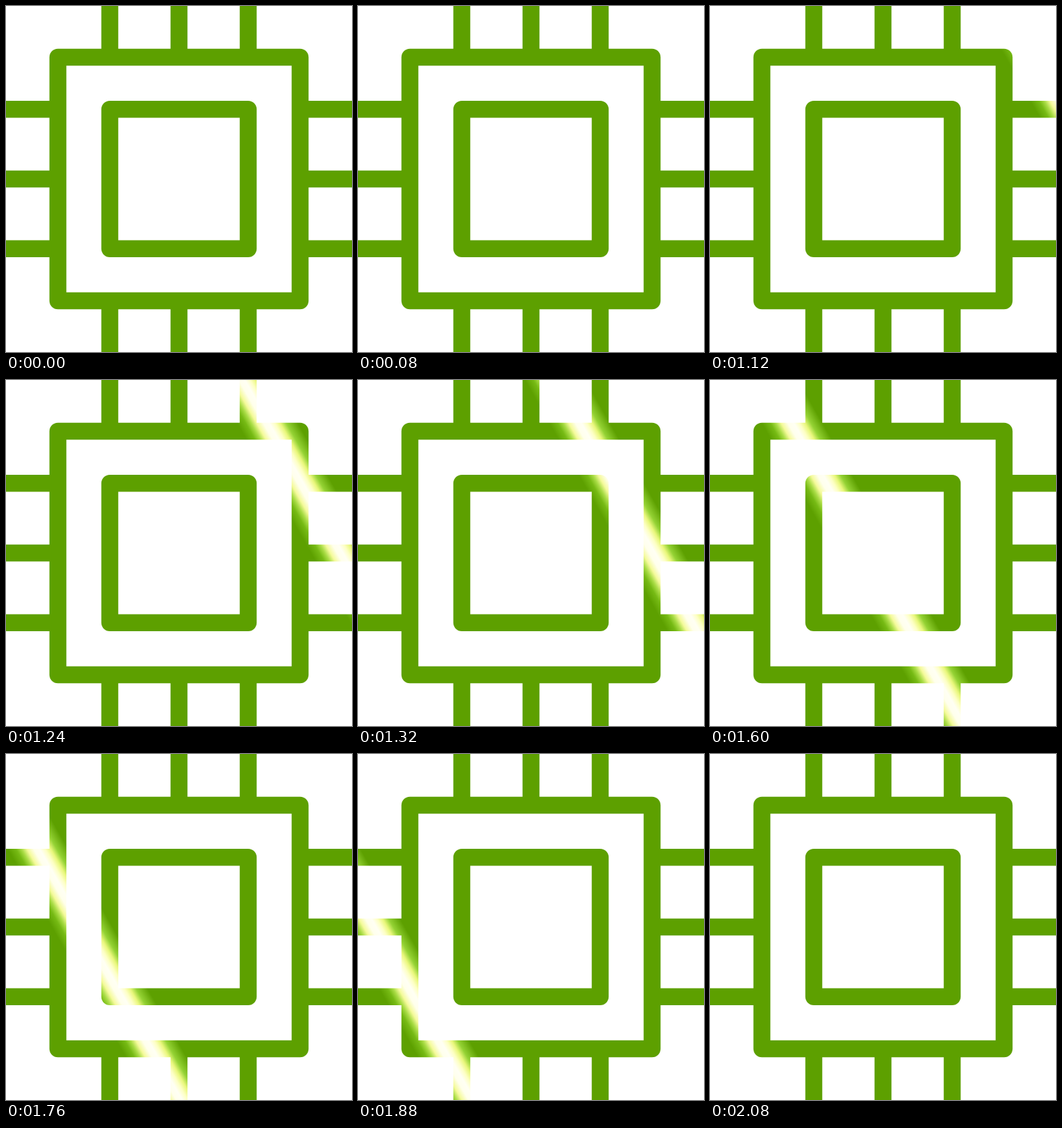
Recreate the animation shown at these times as an HTML page. Size 500 by 500 pixels, loop 4120 ms.

```html
<!DOCTYPE html>
<html lang="en">
<head>
<meta charset="utf-8">
<title>Chip icon with shine</title>
<style>
  html, body { margin: 0; width: 100%; height: 100%; overflow: hidden; background: #fff; }
  svg { display: block; width: 100%; height: 100%; }
</style>
</head>
<body>
<svg viewBox="0 0 500 500">
  <defs>
    <linearGradient id="shine" gradientUnits="userSpaceOnUse" x1="-44" y1="0" x2="44" y2="0">
      <stop offset="0" stop-color="#5da000"/>
      <stop offset=".14" stop-color="#76ba14"/>
      <stop offset=".23" stop-color="#a9dc45"/>
      <stop offset=".32" stop-color="#f4fa9a"/>
      <stop offset=".43" stop-color="#ffffec"/>
      <stop offset=".53" stop-color="#fffff4"/>
      <stop offset=".62" stop-color="#fdffc4"/>
      <stop offset=".71" stop-color="#e9f77c"/>
      <stop offset=".81" stop-color="#94d234"/>
      <stop offset="1" stop-color="#5da000"/>
    </linearGradient>
  </defs>
  <path id="chip" fill="none" stroke="#5da000" stroke-width="24.5" stroke-linejoin="round"
    d="M75 74H425V426H75Z M150 149.25H350V350.75H150Z
       M150 0V74 M250 0V74 M350 0V74 M150 426V500 M250 426V500 M350 426V500
       M0 149.25H75 M0 250H75 M0 350.75H75 M425 149.25H500 M425 250H500 M425 350.75H500"/>
</svg>
<script>
  const LOOP = 4120, STEP = 40;
  const SWEEP_START = 1120, SWEEP_END = 2080;
  const START_X = 571, SPEED = 0.72; // band position on the middle row, px per ms
  const chip = document.getElementById('chip');
  const shine = document.getElementById('shine');

  function draw(time) {
    const t = Math.floor((time % LOOP) / STEP) * STEP;
    const active = t >= SWEEP_START && t < SWEEP_END;
    const x = START_X - (t - SWEEP_START) * SPEED;
    chip.setAttribute('stroke', active ? 'url(#shine)' : '#5da000');
    shine.setAttribute('gradientTransform', `translate(${x} 250) skewX(29.6)`);
  }

  const start = performance.now();
  function tick() {
    draw(performance.now() - start);
    requestAnimationFrame(tick);
  }
  tick();
</script>
</body>
</html>
```
